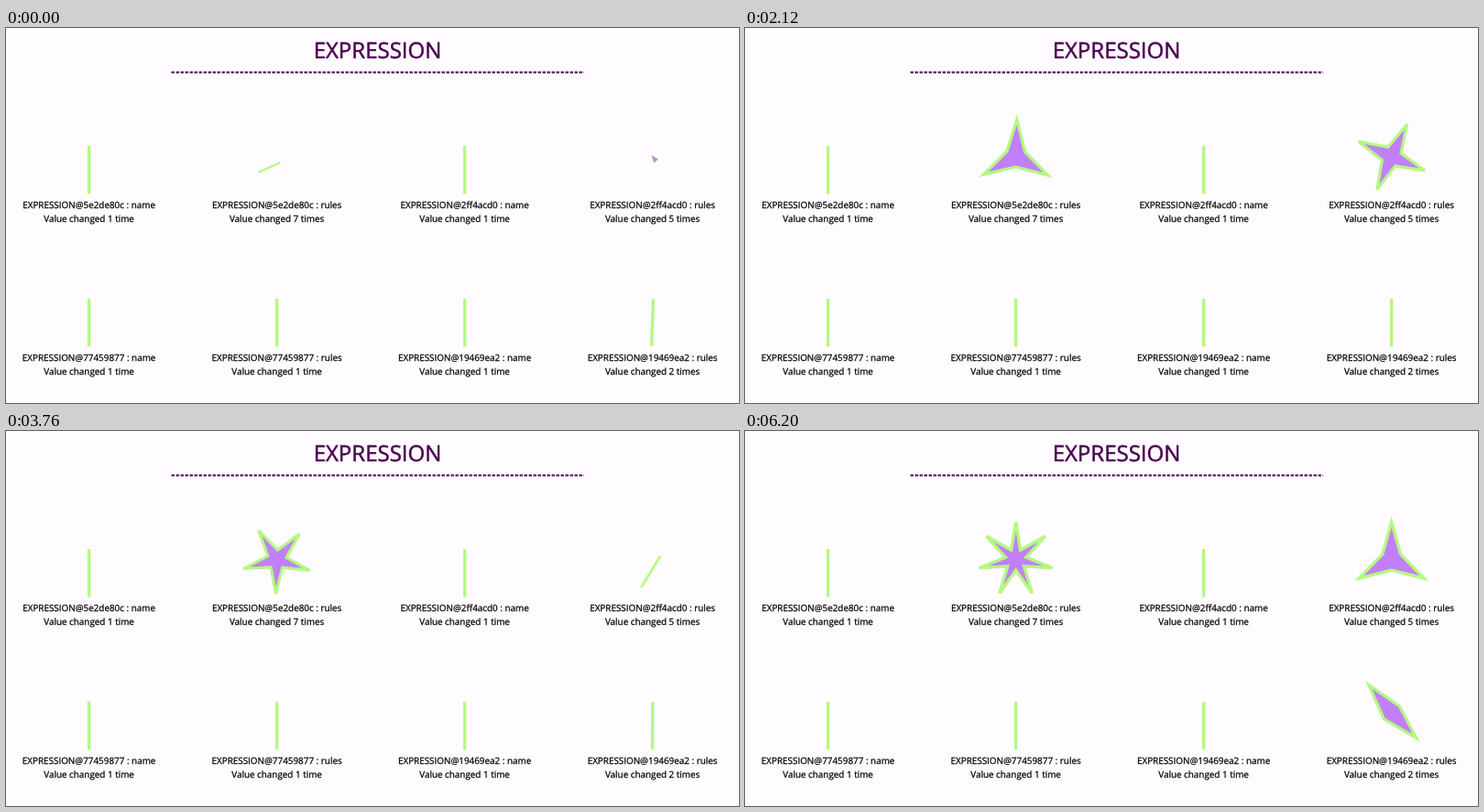
Recreate the animation shown at these times as an HTML page. Size 800 by 410 pixels, loop 6.24 s.

```html
<!DOCTYPE html>
<html>
<head>
<meta charset="utf-8">
<style>
  html, body { margin: 0; width: 100%; height: 100%; overflow: hidden; background: #fefcff; }
  svg { display: block; font: 9.9px "Open Sans", "Noto Sans", sans-serif; }
  text { text-anchor: middle; text-rendering: geometricPrecision; stroke: #000; stroke-width: .25; }
  .title { font-size: 24px; fill: #4b0050; stroke: #4b0050; stroke-width: .5; }
  .rule { stroke: #4b0050; stroke-width: 1.8; stroke-dasharray: 3.4 1.6; }
  path { fill: #c27ffb; stroke: #b5f881; stroke-linejoin: miter; stroke-miterlimit: 4; }
</style>
</head>
<body>
<svg width="800" height="410" viewBox="0 0 800 410">
  <text class="title" x="405.5" y="33.4">EXPRESSION</text>
  <line class="rule" x1="180.5" x2="631" y1="48.5" y2="48.5"/>
</svg>
<script>
const LOOP = 6240, STEP = 40;
const PERIOD = 902;   // ms between value changes
const EASE = 106;     // time constant of the approach to a new value
const OUTER = 41, INNER = 11.5, STROKE = 3.4;

const svg = document.querySelector("svg");

function add(tag, attrs, text = "") {
  const el = document.createElementNS("http://www.w3.org/2000/svg", tag);
  for (const key in attrs) el.setAttribute(key, attrs[key]);
  el.textContent = text;
  return svg.appendChild(el);
}

// A star whose number of points may be fractional while it grows.
function starPath(x, y, points, scale) {
  const half = Math.PI / points, out = [];
  for (let k = 0; k < Math.ceil(2 * points); k++) {
    const a = half / 2 + k * half, r = scale * (k % 2 ? INNER : OUTER);
    out.push((x + r * Math.cos(a)).toFixed(2) + " " + (y + r * Math.sin(a)).toFixed(2));
  }
  return "M" + out.join("L") + "Z";
}

// id, field, number of values, first value, time already spent on it
const cells = [
  ["5e2de80c", "name", 1], ["5e2de80c", "rules", 7, 1, 110],
  ["2ff4acd0", "name", 1], ["2ff4acd0", "rules", 5, 2, 20],
  ["77459877", "name", 1], ["77459877", "rules", 1],
  ["19469ea2", "name", 1], ["19469ea2", "rules", 2, 1, 440]
].map(([id, field, count, first, offset], i) => {
  const x = 90.6 + 205 * (i % 4), y = 140.6 + 167 * (i >> 2);
  add("text", { x, y: y + 55.9 }, `EXPRESSION@${id} : ${field}`);
  add("text", { x, y: y + 71.3 }, `Value changed ${count} time${count > 1 ? "s" : ""}`);
  const path = add("path", { d: starPath(x, y, 1, 1), "stroke-width": STROKE });
  return { x, y, count, first, offset, path };
});
const moving = cells.filter(c => c.count > 1);

function draw(t) {
  for (const { x, y, count, first, offset, path } of moving) {
    const age = t + offset;
    const value = (first - 1 + Math.floor(age / PERIOD)) % count;
    const grown = 1 - Math.exp(-(age % PERIOD) / EASE);
    path.setAttribute("d", grown > 0 ? starPath(x, y, value + grown, grown) : "");
    path.setAttribute("stroke-width", STROKE * grown);
  }
}

const begin = performance.now();
function tick() {
  const t = (performance.now() - begin) % LOOP;
  draw(Math.floor(t / STEP) * STEP);
  requestAnimationFrame(tick);
}
tick();
</script>
</body>
</html>
```
